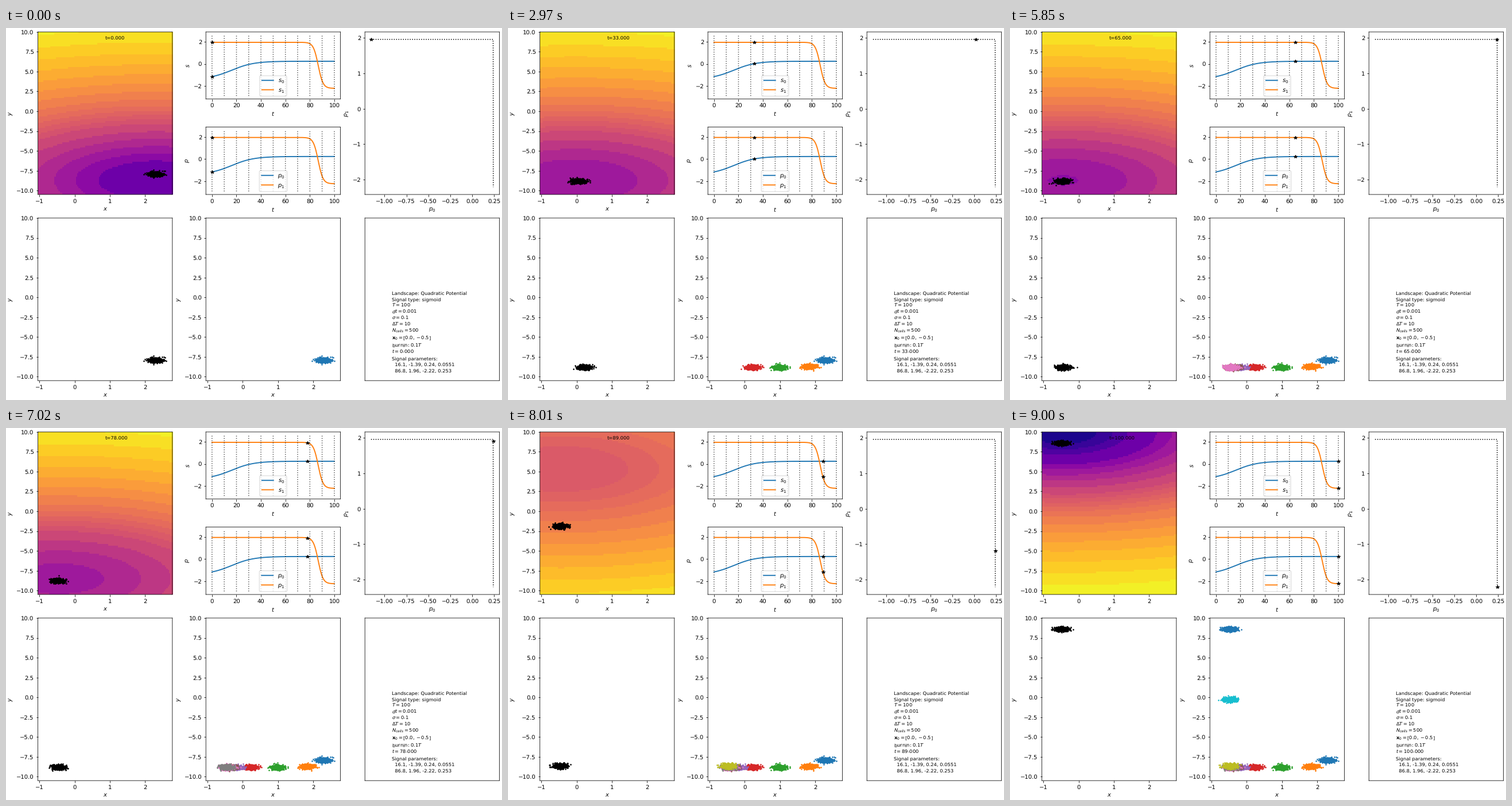
Animation, 864 px wide and 648 px high, one loop 9090 ms. Source, as a matplotlib script:

```python
import matplotlib.pyplot as plt
import numpy as np
from matplotlib.animation import FuncAnimation

W, H, DPI = 864, 648, 72
T_END, GAP, N_CELLS, SIGMA, DT = 100, 10, 500, 0.1, 0.02
# Sigmoid signals: critical time, start, end, rate
SIG0 = (16.1, -1.39, 0.24, 0.0551)
SIG1 = (86.8, 1.96, -2.22, 0.253)
XLIM, YLIM = (-1.046, 2.776), (-10.5, 10.0)
SMALL = 10 * 0.833

# Soft edges and evenly spaced glyphs
plt.rcParams.update({"text.hinting": "none", "path.snap": False})


def sigmoid(t, params):
    tc, start, end, rate = params
    return start + (end - start) * 0.5 * (1 + np.tanh(rate * (t - tc)))


def signals(t):
    return sigmoid(t, SIG0), sigmoid(t, SIG1)


def simulate():
    """Noisy gradient descent; cell positions at every whole time."""
    rng = np.random.default_rng(11)
    cells = np.tile([0.0, -0.5], (N_CELLS, 1))
    stiffness = np.array([1 / 2, 2 / 9])
    burnin = 0.1 * T_END
    per_unit = round(1 / DT)
    states = []
    for n in range(-int(burnin * per_unit), T_END * per_unit + 1):
        if n >= 0 and n % per_unit == 0:
            states.append(cells.copy())
        tilt = np.array(signals(max(n * DT, 0)))
        noise = rng.standard_normal(cells.shape)
        cells += -(stiffness * cells + tilt) * DT + SIGMA * np.sqrt(DT) * noise
    return states


states = simulate()

# Potential on a coarse grid, log scaled over the whole run
gx, gy = np.meshgrid(np.linspace(*XLIM, 100), np.linspace(*YLIM, 100))


def potential(t):
    p0, p1 = signals(t)
    return gx**2 / 4 + gy**2 / 9 + p0 * gx + p1 * gy


fields = [potential(t) for t in range(T_END + 1)]
low = min(f.min() for f in fields)
top = np.log1p(max(f.max() for f in fields) - low)
edges = np.concatenate([np.arange(0, 4) / 19, np.arange(5, 11) / 19,
                        [0.555, 0.583, 0.609, 0.637],
                        np.linspace(0.67, 1, 9)])
bands = plt.get_cmap("plasma")((edges[:-1] + edges[1:]) / 2)


def shade(t):
    level = np.log1p(fields[t] - low) / top
    return bands[np.clip(np.digitize(level, edges) - 1, 0, len(bands) - 1)]


fig = plt.figure(figsize=(W / DPI, H / DPI), dpi=DPI)


def panel(left, upper, right, lower, xlabel="", ylabel=""):
    ax = fig.add_axes([left / W, 1 - lower / H,
                       (right - left) / W, (lower - upper) / H])
    ax.set_xlabel(xlabel)
    ax.set_ylabel(ylabel)
    return ax


def plane(left, upper, right, lower):
    ax = panel(left, upper, right, lower, "$x$", "$y$")
    ax.set(xlim=XLIM, ylim=YLIM)
    return ax


def dots(ax, color, cells):
    return ax.scatter(*cells.T, s=2.5, color=color, zorder=2)


def star(ax):
    return ax.plot([], [], "k*", ms=6)[0]


COLS = [(55.6, 289.8), (348.2, 582.6), (625.2, 859.4)]
ROWS = [(6.9, 290.0), (331.0, 614.2)]


def cell(col, row):
    return COLS[col][0], ROWS[row][0], COLS[col][1], ROWS[row][1]


# Landscape
land = plane(*cell(0, 0))
image = land.imshow(shade(0), extent=(*XLIM, *YLIM), origin="lower",
                    aspect="auto", interpolation="nearest")
land_dots = dots(land, "k", states[0])
clock = land.text(0.5, 0.95, "", fontsize=SMALL, transform=land.transAxes)

# Signal and parameter curves
times = np.linspace(0, T_END, 1001)
curves = signals(times)
stars = []
for name, upper, lower in (("s", 6.9, 123.7), ("p", 172.5, 290.0)):
    ax = panel(COLS[1][0], upper, COLS[1][1], lower, "$t$", f"${name}$")
    for i, curve in enumerate(curves):
        ax.plot(times, curve, lw=1.9, label=f"${name}_{i}$")
    ax.vlines(np.arange(0, T_END + 1, GAP), -2.91, 2.61, colors="k",
              linestyles=":", alpha=0.65)
    ax.set(xlim=(-5, 105), ylim=(-3.19, 2.9))
    ax.legend(loc="lower center")
    stars.append([star(ax), star(ax)])

# Path through parameter space
path = panel(*cell(2, 0), "$p_0$", "$p_1$")
path.plot(*curves, "k:")
path_lims = path.get_xlim(), path.get_ylim()
path_star = star(path)
path.set(xlim=path_lims[0], ylim=path_lims[1])

# Latest and accumulated snapshots
latest_dots = dots(plane(*cell(0, 1)), "k", states[0])
history = plane(*cell(1, 1))
snapshots = [dots(history, f"C{k % 10}", states[k * GAP])
             for k in range(T_END // GAP + 1)]

# Run details
info = panel(*cell(2, 1))
info.set(xticks=[], yticks=[])
x0_row = r"$\mathbf{x}_0=[0.0, -0.5]$"
burnin_row = "burnin: $0.1T$"
time_row = "$t={:.3f}$"
rows = [
    "Landscape: Quadratic Potential",
    "Signal type: sigmoid",
    f"$T={T_END}$",
    "$dt=0.001$",
    rf"$\sigma={SIGMA}$",
    rf"$\Delta T={GAP}$",
    f"$N_{{cells}}={N_CELLS}$",
    x0_row,
    burnin_row,
    time_row,
    "Signal parameters:",
    *("  " + ", ".join(f"{v:g}" for v in sig) for sig in (SIG0, SIG1)),
]
labels = {}
base = ROWS[1][1] - 14.2
for row in reversed(rows):
    labels[row] = fig.text(672.06 / W, 1 - base / H, row, fontsize=SMALL)
    base -= 13 if row in (x0_row, burnin_row) else 11


def update(t):
    image.set_data(shade(t))
    land_dots.set_offsets(states[t])
    clock.set_text(f"t={t:.3f}")
    values = signals(t)
    for pair in stars:
        for marker, value in zip(pair, values):
            marker.set_data([t], [value])
    path_star.set_data([values[0]], [values[1]])
    last = t // GAP
    latest_dots.set_offsets(states[last * GAP])
    for k, snap in enumerate(snapshots):
        snap.set_visible(k <= last)
    labels[time_row].set_text(time_row.format(t))
    return []


anim = FuncAnimation(fig, update, frames=T_END + 1, interval=90,
                     init_func=lambda: update(0), repeat=True)
plt.show()
```
